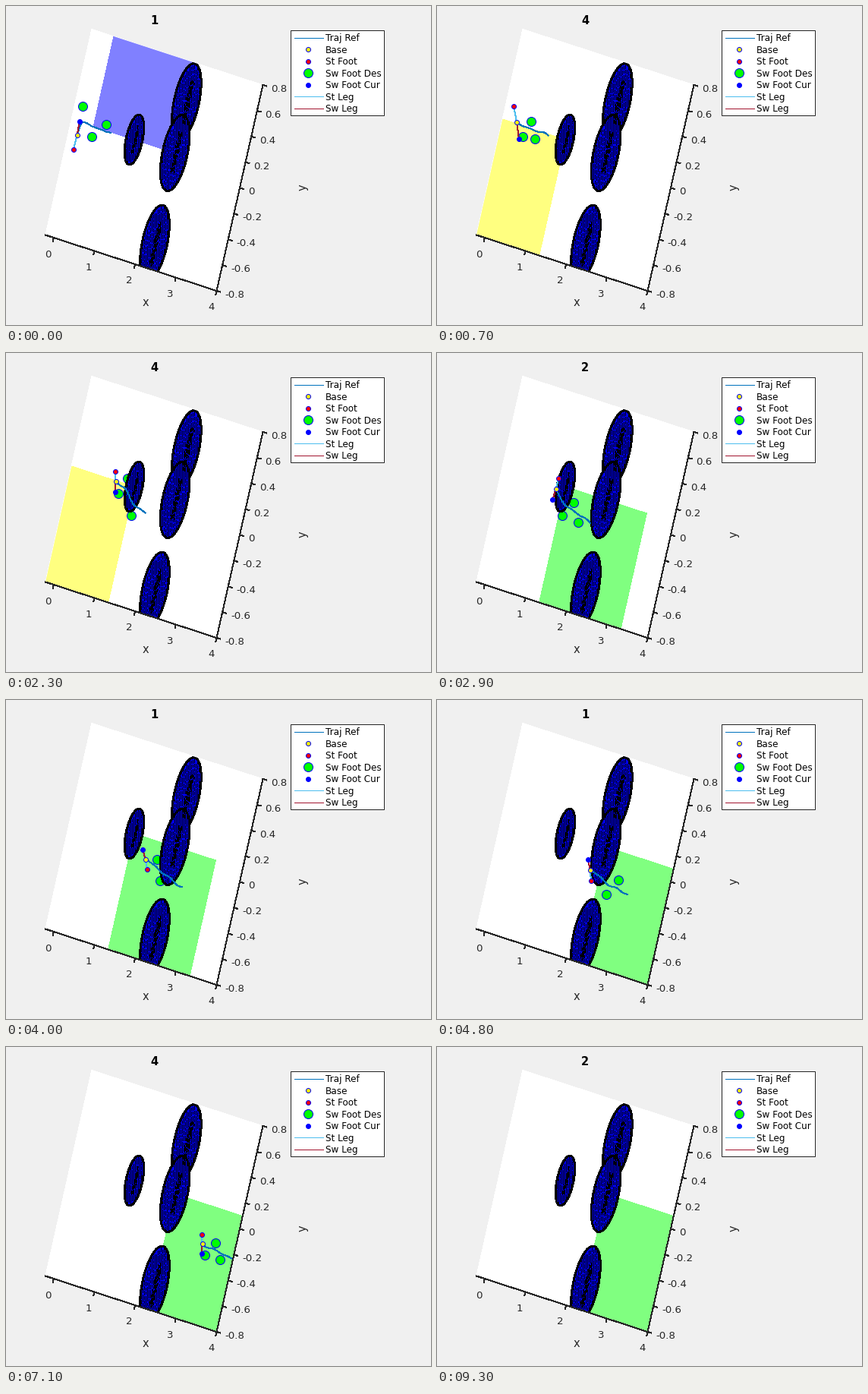
Animation of 560 by 420 pixels, one loop 9.4 s. Source, as a matplotlib script:

```python
import numpy as np
import matplotlib.pyplot as plt
from matplotlib.animation import FuncAnimation
from matplotlib.collections import LineCollection
from matplotlib.patches import Polygon, Rectangle

W, H, DPI = 560, 420, 100
FRAMES, INTERVAL = 94, 100
STEP_FRAMES = 4
PT = 72 / DPI

INK = "#262626"
BLUE, GREEN, YELLOW, RED = "#0000ff", "#00ff00", "#ffff00", "#ff0000"
TRAJ, ST_LEG, SW_LEG = "#0072bd", "#4dbeee", "#a2142f"

plt.rcParams["font.family"] = "DejaVu Sans"
plt.rcParams["lines.antialiased"] = False
fig = plt.figure(figsize=(W / DPI, H / DPI), dpi=DPI, facecolor="#f0f0f0")
ax = fig.add_axes([0, 0, 1, 1])
ax.set_xlim(0.5, W + 0.5)
ax.set_ylim(H, 0)
ax.axis("off")

# Ground plane to stage pixels
ORIGIN = np.array([93.7, 169.5])
EX = np.array([53.7, 17.5])
EY = np.array([38.1, -169.4])


def to_px(x, y):
    return ORIGIN + np.multiply.outer(x, EX) + np.multiply.outer(y, EY)


def box_px(x0, x1, y0, y1):
    return to_px(np.array([x0, x1, x1, x0]), np.array([y0, y0, y1, y1]))


def inside(p):
    return p[0] < 278 + (375 - p[1]) * EY[0] / -EY[1]


def label(x, y, s, size, color=INK, **kw):
    return ax.text(x, y + 0.36 * size, s, fontsize=size * PT, color=color,
                   va="baseline", zorder=9, **kw)


def line(color, z):
    return ax.plot([], [], color=color, lw=PT, zorder=z)[0]


def ruler(xs, ys):
    line(INK, 8).set_data(xs, ys)


def dots(face, size, z):
    return ax.plot([], [], "o", ms=size * PT, mfc=face, mec=BLUE, mew=PT,
                   zorder=z, clip_on=False, antialiased=True)[0]


# Plot panel, rulers and labels
panel = Polygon(box_px(-0.2, 4, -0.8, 0.8), fc="white", ec="none",
                antialiased=False, zorder=0)
ax.add_patch(panel)
ruler(*to_px(np.array([-0.2, 4, 4]), np.array([-0.8, -0.8, 0.8])).T)

for i in range(5):
    x, y = to_px(i, -0.8)
    ruler([x, x - 1.1], [y, y + 4.8])
    label(55.4 + 53.8 * i, 326 + 17.3 * i, str(i), 13.33, ha="center")

for i in range(9):
    value = round(0.8 - 0.2 * i, 1)
    x, y = to_px(4, value)
    ruler([x, x + 4.8], [y, y + 1.5])
    label(349.5 - 7.55 * i, 108.5 + 33.8 * i, f"{value:g}" if value else "0", 13.33)

label(184.5, 390, "x", 14.67, ha="center")
ax.text(391.5, 238.5, "y", fontsize=14.67 * PT, color=INK, rotation=90,
        ha="center", va="center")
title = label(195.5, 19, "1", 14.67, ha="center", weight="bold", color="black")


def add_legend():
    ax.add_patch(Rectangle((375, 31.5), 123, 112, fc="white", ec=INK,
                           lw=PT, zorder=7))
    rows = [("Traj Ref", TRAJ, 0), ("Base", YELLOW, 6), ("St Foot", RED, 6),
            ("Sw Foot Des", GREEN, 12), ("Sw Foot Cur", BLUE, 6),
            ("St Leg", ST_LEG, 0), ("Sw Leg", SW_LEG, 0)]
    for i, (name, color, size) in enumerate(rows):
        y = 41.6 + 15.5 * i
        if size:
            dots(color, size, 8).set_data([398.5], [y])
        else:
            line(color, 8).set_data([380, 418], [y, y])
        label(421.3, y + 0.3, name, 12, color="black")


add_legend()


# Obstacles: blue discs covered by a dense black mesh
def add_obstacle(cx, cy, r, rng):
    a = np.linspace(0, 2 * np.pi, 120)
    rim = to_px(cx + r * np.cos(a), cy + r * np.sin(a))
    disc = Polygon(rim, fc=BLUE, ec="black", lw=2 * PT, antialiased=False, zorder=4)
    ax.add_patch(disc)
    disc.set_clip_path(panel)

    mid = to_px(cx, cy)
    inverse = np.linalg.inv(np.array([EX, EY]).T)
    half_w = r * np.hypot(EX[0], EY[0])
    half_h = r * np.hypot(EX[1], EY[1])
    lean = -EY[0] / EY[1]
    dashes = []
    for x in np.arange(round(mid[0] - half_w), mid[0] + half_w):
        y = mid[1] - half_h - rng.uniform(0, 4)
        while y < mid[1] + half_h:
            run = rng.uniform(2.5, 6)
            ends = np.array([[x, y], [x, y + run]])
            dist = np.hypot(*(inverse @ (ends - mid).T)) / r
            off = abs(x - mid[0] + (y - mid[1]) * lean) / half_w
            core = off < 0.15 and dist.max() < 0.6
            if dist.max() < 1 and (x % 2 == 0 or core):
                dashes.append(ends)
            y += run + rng.uniform(1, 3) * r / 0.3
    mesh = LineCollection(dashes, colors="black", linewidths=PT,
                          zorder=4.1, antialiaseds=False)
    ax.add_collection(mesh, autolim=False)
    mesh.set_clip_path(panel)


rng = np.random.default_rng(4)
for cx, cy, r in [(1.34, 0.1, 0.193), (2.34, 0.5, 0.293),
                  (2.34, 0.1, 0.293), (2.34, -0.6, 0.293)]:
    add_obstacle(cx, cy, r, rng)

# Safe regions: first step in which each is used, its box and colour
REGIONS = [(0, (0.34, 2.34, 0.1, 0.8), "#8080ff"),
           (1, (-0.2, 1.34, -0.8, 0.1), "#ffff80"),
           (6, (1.34, 3.34, -0.8, 0.1), "#80ff80"),
           (12, (2.34, 4, -0.8, 0.1), "#80ff80")]
region = Polygon(box_px(0, 1, 0, 1), ec="none", antialiased=False, zorder=1)
ax.add_patch(region)
region.set_clip_path(panel)

# Footfalls, left and right in turn; the first two are the starting stance
FEET = [(97, 151), (89, 188), (101, 131), (113, 171), (124, 151), (129, 174),
        (144, 155.5), (148, 184.5), (160, 164), (165, 213), (180, 196),
        (186, 222), (199, 209), (203, 237), (219, 223), (223, 255), (239, 236),
        (243, 264), (258, 246), (262, 273), (276, 257), (282, 279), (296, 269),
        (303, 291)]
while len(FEET) < 34:
    FEET.append((FEET[-2][0] + 22, FEET[-2][1] + 12))
FEET = np.array(FEET, float) + 0.5
FIRST_PLAN = (132.5, 155.5)


def smooth(points, t_end, n=60):
    """Catmull-Rom curve through the points, cut at parameter t_end."""
    p = np.vstack([points[0], points, points[-1]])
    t = np.linspace(0, t_end, n)
    i = np.minimum(t.astype(int), len(points) - 2)
    u = (t - i)[:, None]
    a, b, c, d = p[i], p[i + 1], p[i + 2], p[i + 3]
    return 0.5 * (2 * b + (c - a) * u + (2 * a - 5 * b + 4 * c - d) * u**2
                  + (3 * b - a - 3 * c + d) * u**3)


traj = line(TRAJ, 5)
st_leg = line(ST_LEG, 5)
sw_leg = line(SW_LEG, 5)
for item in (traj, st_leg, sw_leg):
    item.set_clip_path(panel)
desired = dots(GREEN, 12, 3)
current = dots(BLUE, 6, 6)
stance_dot = dots(RED, 6, 6)
base_dot = dots(YELLOW, 6, 6.1)


def place(artist, points):
    shown = [p for p in points if inside(p)]
    artist.set_data([p[0] for p in shown], [p[1] for p in shown])


def draw(frame):
    step, phase = divmod(frame, STEP_FRAMES)
    title.set_text(str(phase + 1))

    box, color = [(b, c) for start, b, c in REGIONS if step >= start][-1]
    region.set_xy(box_px(*box))
    region.set_facecolor(color)

    # Plan window: swing start, stance, then the coming footfalls
    feet = FEET[step:step + 9].copy()
    if step == 0:
        feet[4] = FIRST_PLAN
    stance = feet[1]
    swing = feet[0] + (feet[2] - feet[0]) * 0.264 * phase
    base = (stance + swing) / 2 + (0.6, 0)

    knots = 0.55 * feet[2:7] + 0.225 * (feet[1:6] + feet[3:8])
    path = smooth(np.vstack([base, knots]), 4.5)
    traj.set_data(*path.T)
    st_leg.set_data(*np.array([base, stance]).T)
    sw_leg.set_data(*np.array([base, swing]).T)

    place(desired, feet[2:5])
    place(current, [swing])
    place(stance_dot, [stance])
    place(base_dot, [base])
    return []


anim = FuncAnimation(fig, draw, frames=FRAMES, interval=INTERVAL,
                     repeat=True, repeat_delay=0, blit=False)
plt.show()
```
